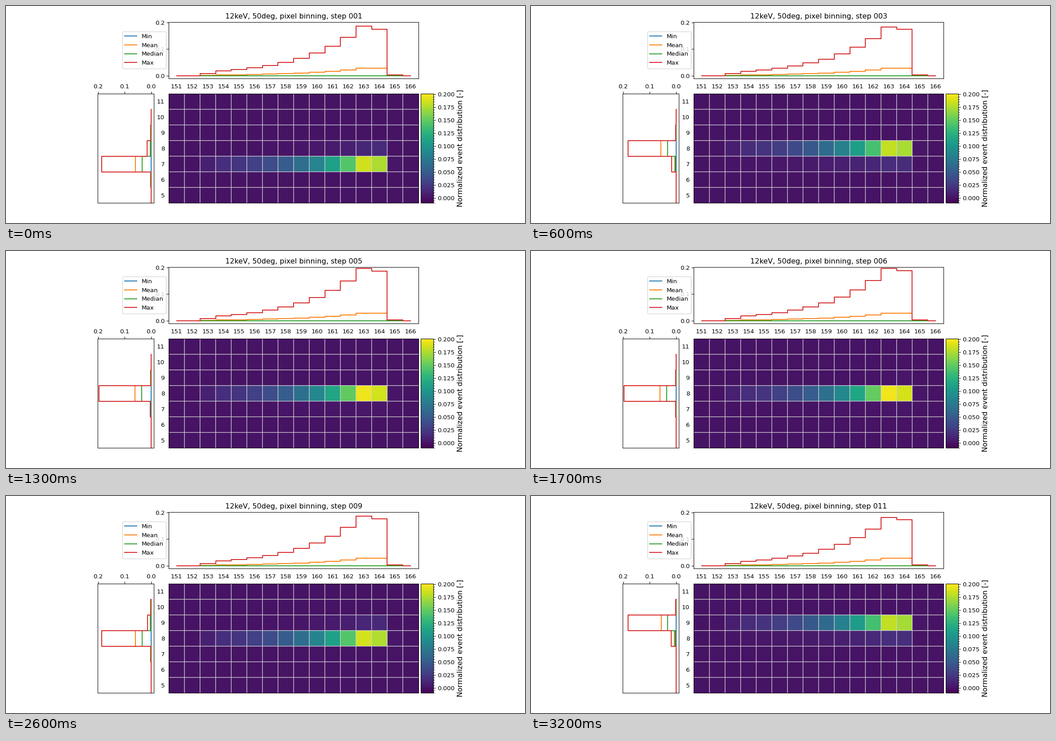
These frames come from a looping animation (1155x485 px, 3300 ms). A matplotlib script:

```python
import numpy as np
import matplotlib.pyplot as plt
from matplotlib.animation import FuncAnimation
from matplotlib.ticker import MultipleLocator

W, H, DPI = 1155, 485, 96.25
STEPS, STEP_MS = 11, 300
LOW, HIGH = -0.01, 0.201

COLS = np.arange(151, 167)
ROWS = np.arange(5, 12)
STATS = {"Min": np.min, "Mean": np.mean, "Median": np.median, "Max": np.max}

PEAK, DECAY, TILT = 0.2, 0.269, 0.17
FIRST_CROSSING, STEPS_PER_ROW = 2.09, 8.05

# Exponential track, only partly covering the pixels at its two ends.
coverage = np.interp(COLS, [152, 153, 154, 163, 164, 165, 166],
                     [0, 0.65, 1, 1, 0.73, 0.007, 0])
TRACK = PEAK * np.exp(DECAY * (COLS - 163)) * coverage


def share_above(edge, step):
    """Part of the beam above a row edge, for each column."""
    ahead = step - FIRST_CROSSING - STEPS_PER_ROW * (edge - 7.5)
    share = 1 / (1 + np.exp(-1.6 * np.arcsinh(2.27 * ahead)))
    tilt = TILT if ahead < 0 else 0
    return share * np.exp(tilt * (COLS - 163))


def make_grid(step):
    above = [share_above(edge, step) for edge in ROWS[1:] - 0.5]
    above = np.array([np.ones(len(COLS)), *above, np.zeros(len(COLS))])
    return TRACK * (above[:-1] - above[1:])


# The small margin keeps the pixel size from being rounded down.
fig = plt.figure(figsize=((W + 0.001) / DPI, (H + 0.001) / DPI), dpi=DPI,
                 facecolor="white")


def add_axes(x0, y0, x1, y1):
    """Axes from pixel corners, measured from the top left."""
    return fig.add_axes([x0 / W, 1 - y1 / H, (x1 - x0) / W, (y1 - y0) / H])


heat = add_axes(362.4, 195.9, 917.8, 440.4)
top = add_axes(362.4, 36.1, 917.8, 161.7)
left = add_axes(204.3, 195.9, 328.6, 440.4)
bar = add_axes(922.8, 195.9, 950.8, 440.4)

mesh = heat.pcolormesh(np.arange(150.5, 167), np.arange(4.5, 12), make_grid(1),
                       cmap="viridis", vmin=LOW, vmax=HIGH)
for x in COLS[1:] - 0.5:
    heat.axvline(x, color="lightgray", lw=1, snap=False)
for y in ROWS[1:] - 0.5:
    heat.axhline(y, color="lightgray", lw=1, snap=False)
heat.set(xlim=(150.5, 166.5), ylim=(4.5, 11.5), xticks=COLS, yticks=ROWS)
heat.tick_params(length=0, pad=7, top=True, labeltop=True, labelbottom=False)

top_lines = [top.step(COLS, 0 * COLS, where="mid", label=name)[0] for name in STATS]
top.set(xlim=(150.5, 166.5), ylim=(LOW, HIGH), xticks=[], yticks=[0, 0.1, 0.2])
top.legend(loc="center right", bbox_to_anchor=(0, 0.506), fontsize=10)
title = top.set_title("", fontsize=12)

left_lines = [left.step(0 * ROWS, ROWS - 0.5)[0] for _ in STATS]
left.set(xlim=(HIGH, LOW), ylim=(4.5, 11.5), xticks=[0, 0.1, 0.2], yticks=[])
left.tick_params(top=True, labeltop=True, bottom=False, labelbottom=False)

cbar = fig.colorbar(mesh, cax=bar)
cbar.set_label("Normalized event distribution [-]", fontsize=12)
bar.yaxis.set_major_locator(MultipleLocator(0.025))
bar.yaxis.set_minor_locator(MultipleLocator(0.005))
bar.yaxis.set_major_formatter("{x:.3f}")


def update(i):
    grid = make_grid(i + 1)
    mesh.set_array(grid)
    for across, down, stat in zip(top_lines, left_lines, STATS.values()):
        across.set_ydata(stat(grid, axis=0))
        down.set_xdata(stat(grid, axis=1))
    title.set_text(f"12keV, 50deg, pixel binning, step {i + 1:03d}")
    return [mesh, title, *top_lines, *left_lines]


anim = FuncAnimation(fig, update, frames=STEPS, interval=STEP_MS,
                     init_func=lambda: update(0), repeat=True, repeat_delay=0)
plt.show()
```
